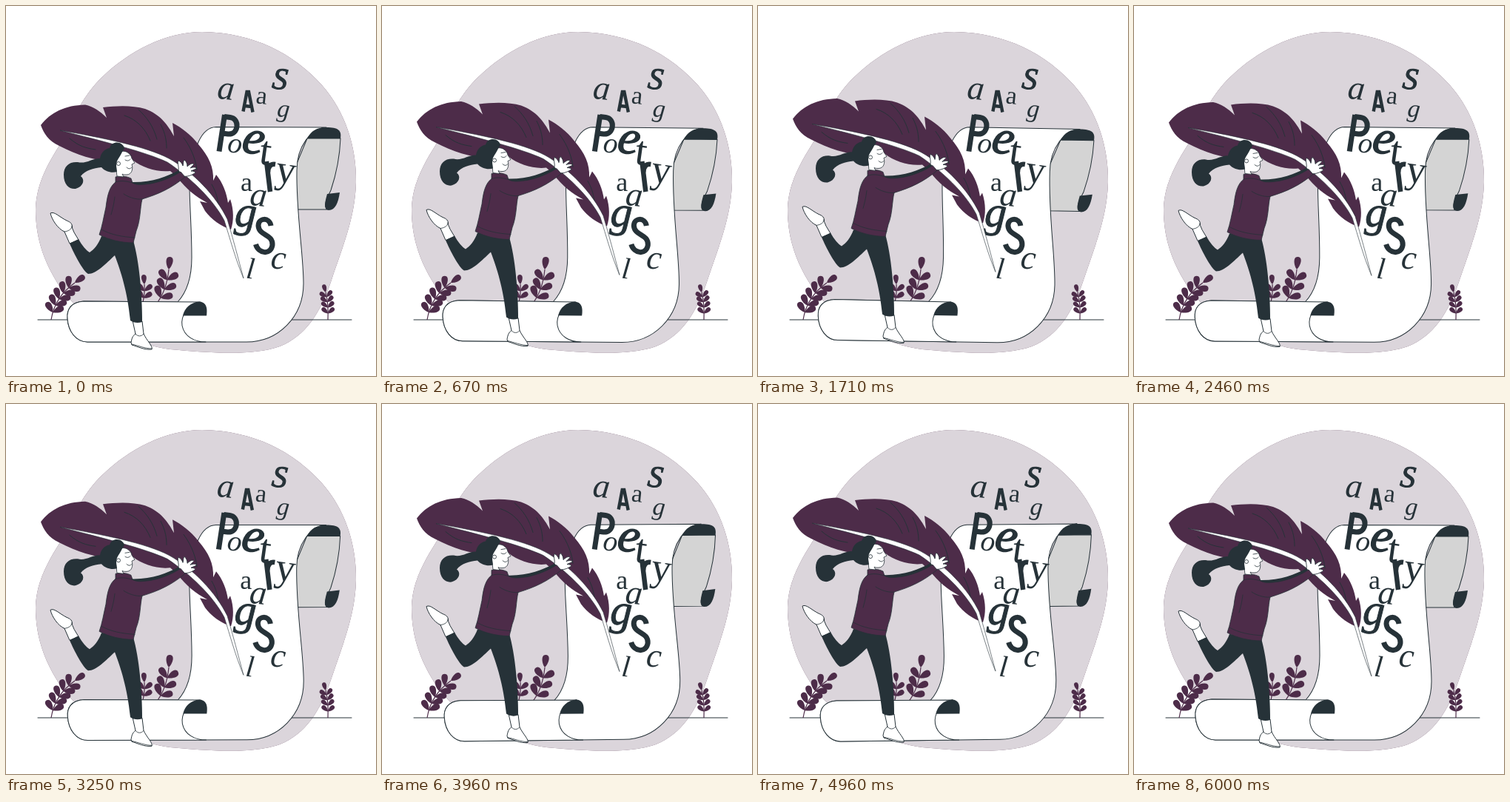
An HTML page for the animation above (6040 ms loop, 500 by 500 pixels).

```html
<!DOCTYPE html>
<html lang="en">
<head>
<meta charset="utf-8">
<title>Poetry</title>
<style>
  html, body { margin: 0; width: 100%; height: 100%; overflow: hidden; background: #fff; }
  svg { display: block; width: 100%; height: 100%; }
  .line { fill: none; stroke: #263238; stroke-linecap: round; stroke-linejoin: round; }
  .paper { fill: #fff; stroke: #263238; stroke-linejoin: round; }
  .ink { fill: #263238; }
  .plum { fill: #4d2c49; }
  .sans { fill: none; stroke: #263238; }
  text { font-family: "Liberation Serif", "Times New Roman", serif; text-anchor: middle; fill: #263238; stroke: #263238; }
</style>
</head>
<body>
<svg viewBox="0 0 500 500">
  <defs>
    <path id="blob" d="M265 35C335 36 388 64 427 107C458 142 474 190 473 238C472 285 455 325 440 370C425 415 405 446 370 460C330 474 270 468 222 464C180 459 112 430 78 387C52 350 40 315 40 275C41 237 60 208 76 182C90 152 105 120 130 96C165 62 215 35 265 35Z"/>
  </defs>
  <use href="#blob" class="plum"/>
  <use href="#blob" fill="#fff" opacity=".8"/>
  <path class="line" d="M43 424H467"/>
  <g id="plants" class="plum"></g>

  <g id="paper">
    <path d="M407 179H452C451 205 446 228 439 249C434 259 428 271 434 275H392V215Z" fill="#d4d4d4" stroke="#263238"/>
    <path class="ink" d="M434 254L451 252C449 266 445 276 436 276C428 274 432 262 434 254Z"/>
    <path class="paper" d="M105 399C88 400 82 410 83 422C84 440 95 454 110 454H325C368 454 402 420 402 375C402 335 392 280 393 222C393 190 412 165 433 164L284 163.500C262 164 252 195 248 240C248 270 251 300 251 340C251 368 243 388 232 400Z"/>
    <path class="ink" d="M407 179C412 169 420 164 433 164C449 164 454 168 452 179Z"/>
    <path class="paper" d="M105 399L262 400C245 402 236 420 238 432C241 447 255 454 270 454H110C95 454 84 440 83 422C82 410 88 400 105 399Z"/>
    <path class="ink" d="M262 399.500C272 401 272 410 271 418.500H239C241 408 250 400 262 399.500Z"/>
  </g>

  <g id="letters">
    <g class="sans">
      <path stroke-width="4.400" d="M320.500 142.500L325.500 116H328L333.500 143.500M322.500 135L332 136"/>
      <path stroke-width="7" d="M288 196.500L295.500 147M295 149.500L303 150.500C316 152 315 174 300 173L292 172"/>
      <path stroke-width="6.500" d="M352 210L357 251M354 225C354 217 358 213 364 214"/>
      <path stroke-width="7" d="M358 297C356 285 341 286 341 297C342 311 361 308 360 323C358 337 341 335 337.500 322"/>
    </g>
  </g>

  <g id="woman">
    <path class="plum" d="M47 161C60 144 80 134 107 133.500C118 136 127 142 136 151L131 137C150 134.500 172 134 188 139C208 146 219 161 227 176L225 158C237 164 250 174 260 187C274 203 281 218 280 236L284 228C293 239 298 252 300 266L303 261C308 276 308 290 304 302C291 298 277 288 269 277L262 264L272 266C257 258 243 247 232 232L222 223C205 225 185 219 171 208L140 210C121 209 95 201 72 189C57 182 51 172 47 161Z"/>
    <g class="line">
      <path d="M160 148C176 153 188 165 195 182M179 140C190 150 199 162 204 180M209 160C216 173 217 184 217 192M86 179C99 190 108 192 121 194M240 178C252 194 257 211 258 222M278 241C285 253 286 262 287 268"/>
    </g>
    <path d="M73 168C130 178 190 190 220 206C253 224 284 257 299 288C307 315 314 342 321 368C310 342 303 315 295 290C280 261 248 231 218 211C188 197 130 182.500 73 168Z" fill="#fff" stroke="#263238" stroke-width=".6"/>

    <path class="paper" d="M86 321L79 305C70 301 62 289 60 280C65 277 72 285 82 290C87 292 90 294 89.500 300L92 306L98 316Z"/>
    <path class="line" stroke-width=".8" d="M79 305C86 304 89 301 89 297"/>
    <path class="paper" d="M171 425L175 443C171 446 170 449 169 455L170 458C178 460 186 465 197 464C199 460 190 452 186 443L184 426Z"/>
    <path class="line" stroke-width=".8" d="M175 443C178 447 183 447 186 443M170 457C179 459 188 463 197 463"/>
    <path class="ink" d="M129 311L172 317C180 345 184 390 184 427C178 429 172 428 168 425C164 385 155 358 147 337C135 348 122 362 111 362C104 358 92 335 86 321L98 315C103 324 108 330 113 333C119 329 125 322 129 311Z"/>

    <path class="ink" d="M168 238C196 239 217 231 233 222L240 229L185 253Z"/>
    <path class="paper" stroke-width=".9" d="M233 222C234 217 231 212 233 209C236 210 238 213 239 216C240 213 239 210 241 208C244 210 245 214 245 217C249 213 253 212 254 214L249 219C254 217 258 218 257 220L250 223C255 223 257 225 255 226C250 229 245 231 239 230Z"/>
    <path class="plum" stroke="#263238" stroke-width=".8" d="M148 231C155 229 163 230 169 233L171 239C178 243 186 241 196 240C211 237 225 231 236 224L242 231C224 246 207 254 184 261C181 273 182 289 176 304L172 320C156 320 139 316 126 309C130 298 132 285 135 272C137 255 140 244 148 238Z"/>
    <path class="line" stroke-width=".8" d="M129 302C141 309 157 312 174 313M184 261C175 262 165 258 159 254M142 282C145 271 146 266 147 258M148 238C156 235 164 237 171 239"/>

    <path class="paper" stroke-width=".8" d="M152 198C160 193 169 199 170 206L174 212L170 214C172 220 170 228 163 228C160 228 158 228 157 227L159 231L150 230L148 213Z"/>
    <path class="line" stroke-width=".8" d="M161 208C164 210 167 209 168 207M161 203L167 202M163 218C166 221 168 220 170 218"/>
    <path class="ink" d="M160 193C159 183 143 181 140 192C133 193 128 199 127 206C118 205 108 214 97 211C86 210 78 216 78 228C78 242 86 248 94 247C105 244 107 234 101 230C107 222 118 219 129 218C134 224 143 226 150 224C149 217 148 212 152 206C155 202 156 198 160 193Z"/>
    <circle class="paper" stroke-width=".8" cx="152" cy="213" r="2.500"/>
  </g>
</svg>
<script>
const NS = 'http://www.w3.org/2000/svg';
const byId = id => document.getElementById(id);

function add(parent, tag, attrs, content = '') {
  const el = document.createElementNS(NS, tag);
  for (const key in attrs) el.setAttribute(key, attrs[key]);
  el.textContent = content;
  parent.append(el);
}

// character, x, baseline, size, angle, italic, outline
[
  ['a', 296, 126, 46, 6, 1, 0],
  ['a', 344.5, 132, 34, 6, 0, 0],
  ['S', 369, 112, 41, 6, 1, 1.2],
  ['g', 374, 150, 34, 6, 1, 0],
  ['o', 308, 198, 39, 8, 1, 0],
  ['e', 331, 199, 66, 12, 1, 1.5],
  ['t', 348.5, 214, 56, 8, 0, 0],
  ['y', 376, 239, 54, 8, 0, 0],
  ['a', 325, 250, 36, 0, 0, 0],
  ['a', 340, 270, 46, 6, 1, 0],
  ['g', 323, 298, 59, 4, 1, 1],
  ['c', 367, 355, 46, 6, 1, 0],
  ['l', 329, 368, 40, 6, 1, 0]
].forEach(([char, x, y, size, angle, italic, outline]) => add(byId('letters'), 'text', {
  transform: `translate(${x} ${y}) rotate(${angle})`,
  'font-size': size, 'font-style': italic ? 'italic' : 'normal', 'stroke-width': outline
}, char));

// Leaf pairs along a quadratic stem, closed by one leaf at the top
function plant(x0, y0, cx, cy, x1, y1, pairs, size) {
  const g = byId('plants');
  add(g, 'path', { d: `M${x0} ${y0}Q${cx} ${cy} ${x1} ${y1}`, fill: 'none', stroke: '#4d2c49', 'stroke-width': 1.2 });
  for (let i = 1; i <= pairs; i++) {
    const t = i / pairs, u = 1 - t;
    const x = u * u * x0 + 2 * u * t * cx + t * t * x1;
    const y = u * u * y0 + 2 * u * t * cy + t * t * y1;
    const dir = Math.atan2(u * (cy - y0) + t * (y1 - cy), u * (cx - x0) + t * (x1 - cx)) * 180 / Math.PI;
    const w = size * 0.27;
    for (const turn of i < pairs ? [-48, 48] : [0]) add(g, 'path', {
      d: `M0 0C${size * 0.3} ${-w} ${size} ${-w * 1.6} ${size} 0S${size * 0.3} ${w} 0 0`,
      transform: `translate(${x} ${y}) rotate(${dir + turn})`
    });
  }
}
plant(61, 424, 66, 393, 93, 374, 6, 16);
plant(202, 404, 217, 386, 220, 356, 4, 17);
plant(184, 404, 188, 390, 187, 376, 3, 13);
plant(435, 424, 436, 402, 432, 387, 5, 11);

// Linear interpolation through [phase, value] stops
function follow(stops, phase) {
  const i = stops.findIndex(([p]) => p > phase);
  const [p0, v0] = stops[i - 1], [p1, v1] = stops[i];
  return v0 + (v1 - v0) * (phase - p0) / (p1 - p0);
}
const FLOAT = [[0, 0], [.5, -10], [1, 0]];
const SWAY = [[0, 0], [.25, 1], [.75, -1], [1, 0]];
const SHAKE = [[0, 0], [.1, -1], [.2, 2], [.3, -4], [.4, 4], [.5, -4], [.6, 4], [.7, -4], [.8, 2], [.9, -1], [1, 0]];

const start = performance.now();
function draw() {
  const t = (performance.now() - start) % 6040;
  const slow = t % 6000 / 6000, fast = t % 3000 / 3000;
  byId('woman').setAttribute('transform', `translate(0 ${follow(FLOAT, fast)})`);
  byId('paper').setAttribute('transform', `rotate(${follow(SWAY, slow)} 267.5 309)`);
  byId('letters').setAttribute('transform', `translate(${follow(SHAKE, slow)} 0)`);
  requestAnimationFrame(draw);
}
draw();
</script>
</body>
</html>
```
